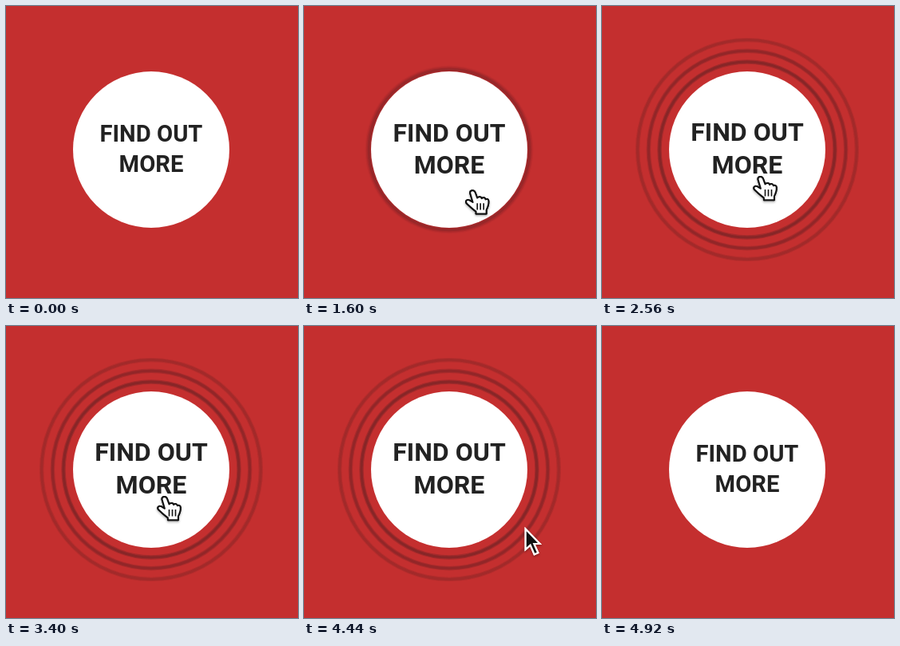
An HTML page with a canvas for the animation above (7.44 s loop, 366x366 px).

```html
<!DOCTYPE html>
<html lang="en">
<head>
<meta charset="utf-8">
<title>Find out more</title>
<style>
html, body { margin: 0; width: 100%; height: 100%; overflow: hidden; background: #c42f2f; }
canvas { display: block; width: 366px; height: 366px; }
</style>
</head>
<body>
<canvas id="stage"></canvas>
<script>
const SIZE = 366, LOOP = 7440, STEP = 40;
const CX = 182, CY = 180, R = 98;
const canvas = document.getElementById('stage');
const ctx = canvas.getContext('2d');
const dpr = window.devicePixelRatio || 1;
canvas.width = canvas.height = Math.round(SIZE * dpr);

const HAND = new Path2D(
  'M-4 6C-4.4 1.8 1 1.4 2.4 5L5 12C7 9.8 10 10.4 10.5 12.6' +
  'C12.4 10.8 15 11.6 15.3 13.8C17.2 12.6 19.2 13.8 19.2 16' +
  'C19.6 20 18.2 23.4 16.4 27L16.4 31.8L3.4 31.8L3.4 29' +
  'C-.8 26.2-4.4 22.6-7.8 19.4C-10.8 16.6-8.4 13.2-5 14.8L-.6 17.4Z');
const LINES = new Path2D('M5 18.6V27M9 18.6V27M13 18.6V27');
const ARROW = new Path2D('M1.6 1.8V27.4L7.6 22L12.6 33.6L17.2 31.6L12.2 20.4H19.4Z');

const ramp = (t, a, b) => Math.min(1, Math.max(0, (t - a) / (b - a)));
const smooth = u => u * u * (3 - 2 * u);
const mix = (a, b, u) => a + (b - a) * u;

function pointer(t) {
  if (t < 1000 || t >= 4800) return null;
  if (t < 4080) {
    const left = 1 - ramp(t, 1000, 1720);
    return [mix(199.5, 342, left ** 1.35), mix(211.4, 359, left ** 1.2)];
  }
  const u = ramp(t, 4080, 4800) ** 1.12;
  return [mix(199.5, 366, u), mix(211.4, 301, u)];
}

function drawRings(e) {
  if (e <= 0) return;
  const fade = Math.min(1, e * 3);
  [0.2, 0.16, 0.1].forEach((alpha, k) => {
    const r = R + e * (12 + 13.7 * k);
    ctx.strokeStyle = `rgba(25,22,28,${alpha * fade})`;
    for (const w of [5.4, 3]) {
      ctx.lineWidth = w;
      ctx.beginPath();
      ctx.arc(CX, CY, r, 0, Math.PI * 2);
      ctx.stroke();
    }
  });
}

function drawLabel(scale) {
  ctx.save();
  ctx.translate(CX, CY);
  ctx.scale(scale, scale);
  ctx.font = '600 29.2px Roboto, sans-serif';
  ctx.textAlign = 'center';
  ctx.fillStyle = '#222';
  ctx.fillText('FIND OUT', 0, -9.6);
  ctx.fillText('MORE', 0, 27.6);
  ctx.restore();
}

function paint(path, fill, stroke, width, join) {
  ctx.save();
  ctx.shadowColor = 'rgba(0,0,0,.4)';
  ctx.shadowBlur = 3 * dpr;
  ctx.shadowOffsetY = 1.5 * dpr;
  ctx.lineWidth = width;
  ctx.lineJoin = join;
  ctx.strokeStyle = stroke;
  ctx.stroke(path);
  ctx.restore();
  ctx.fillStyle = fill;
  ctx.fill(path);
  ctx.lineWidth = width;
  ctx.lineJoin = join;
  ctx.strokeStyle = stroke;
  ctx.stroke(path);
}

function drawPointer([x, y]) {
  ctx.save();
  ctx.translate(x, y);
  if (Math.hypot(x - CX, y - CY) < R) {
    paint(HAND, '#fff', '#111', 2, 'round');
    ctx.lineWidth = 1.6;
    ctx.stroke(LINES);
  } else {
    paint(ARROW, '#111', '#fff', 2.2, 'miter');
  }
  ctx.restore();
}

function draw(t) {
  ctx.setTransform(dpr, 0, 0, dpr, 0, 0);
  ctx.fillStyle = '#c42f2f';
  ctx.fillRect(0, 0, SIZE, SIZE);
  const rings = ramp(t, 1570, 1820) * (1 - smooth(ramp(t, 4480, 4920)));
  const grow = smooth(ramp(t, 1380, 1640)) * (1 - smooth(ramp(t, 4480, 4900)));
  drawRings(rings);
  ctx.fillStyle = '#fff';
  ctx.beginPath();
  ctx.arc(CX, CY, R, 0, Math.PI * 2);
  ctx.fill();
  drawLabel(1 + 0.1 * grow);
  const p = pointer(t);
  if (p) drawPointer(p);
}

const start = performance.now();
function tick() {
  const t = (performance.now() - start) % LOOP;
  draw(Math.floor(t / STEP) * STEP);
  requestAnimationFrame(tick);
}
tick();
</script>
</body>
</html>
```
